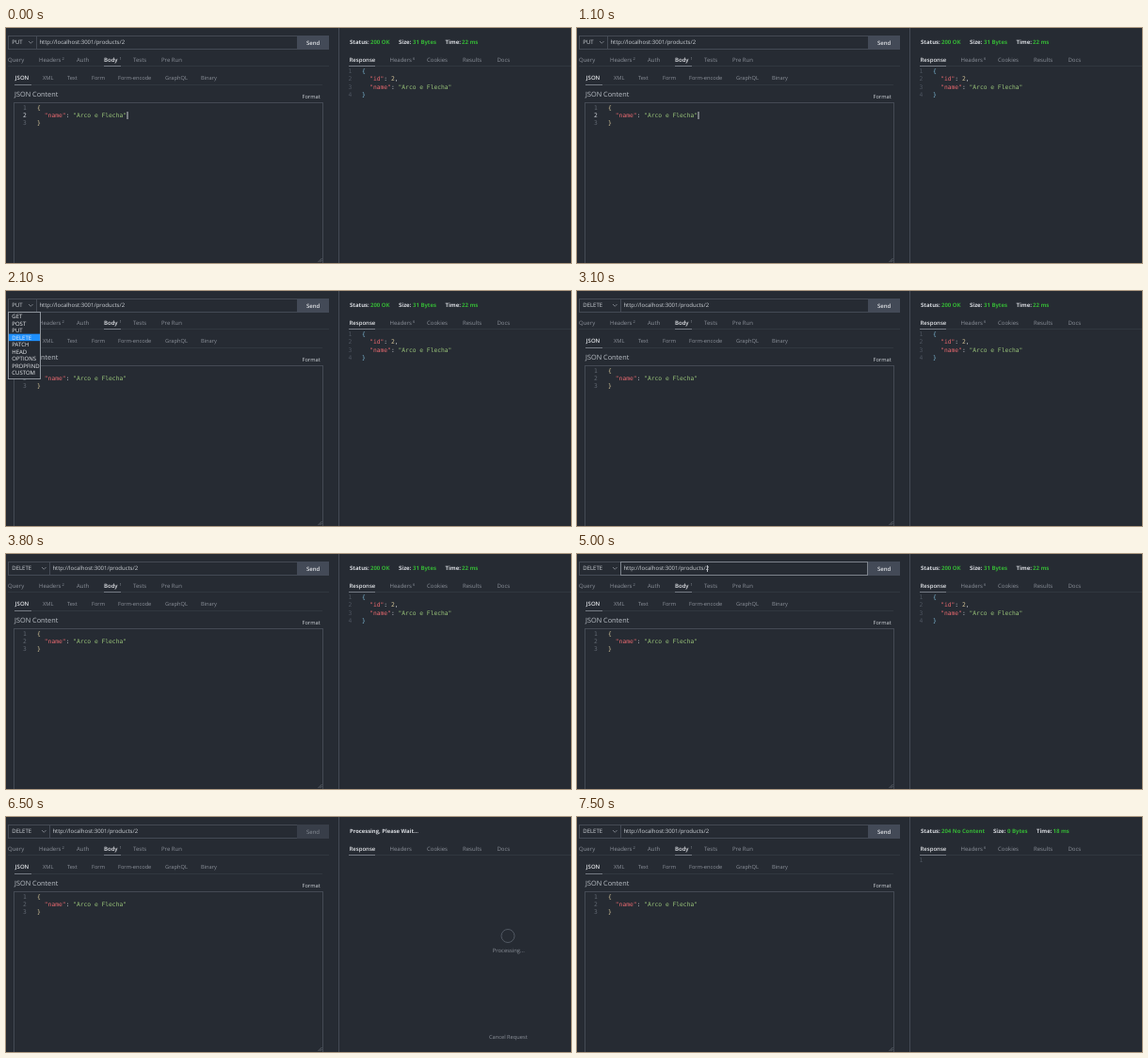
An HTML page that plays this animation: 600 by 250 pixels, repeating every 8 s.

```html
<!DOCTYPE html>
<html lang="en">
<head>
<meta charset="utf-8">
<style>
html, body { margin: 0; width: 100%; height: 100%; overflow: hidden; background: #262b33; }
svg { display: block; width: 600px; height: 250px; }
text { font: 6px "Open Sans", "Noto Sans", sans-serif; fill: #8b9099; text-rendering: geometricPrecision; white-space: pre; }
.lit { fill: #cfd3d8; }
.on { fill: #e2e4e8; font-weight: 600; }
.bold { fill: #d6d9de; font-weight: 700; }
.ok { fill: #35b336; font-weight: 700; }
.title { font-size: 7.3px; fill: #bcc1c8; }
.small { font-size: 5.7px; }
.wait { font-size: 5.85px; }
.item { fill: #eceef1; }
.sup { font-size: 4px; fill: #9298a1; }
.code { font: 6.3px "DejaVu Sans Mono", monospace; fill: #c9cdd3; }
.num { fill: #626973; }
.far { fill: #4e5560; }
.now { fill: #d0d4da; }
.key { fill: #e8696f; }
.str { fill: #98c379; }
.brace { fill: #d6c79a; }
.cool { fill: #7db9d6; }
</style>
</head>
<body>
<svg id="stage" viewBox="0 0 600 250"></svg>
<script>
const LOOP = 8000;
const LINE = "#444a54", FAINT = "#31373f", UNDER = "#747a83";
const text = (x, y, s, cls = "") => `<text x="${x}" y="${y}" class="${cls}">${s}</text>`;
const rect = (x, y, w, h, fill) => `<rect x="${x}" y="${y}" width="${w}" height="${h}" fill="${fill}"/>`;
const box = (x, y, w, h, stroke, fill = "none") =>
  `<rect x="${x + .5}" y="${y + .5}" width="${w - 1}" height="${h - 1}" fill="${fill}" stroke="${stroke}"/>`;
const span = (s, cls) => `<tspan class="${cls}">${s}</tspan>`;
// Content shown only during the listed "from-to" times
const during = (times, ...parts) => `<g data-times="${times}">${parts.join("")}</g>`;
const tabs = (y, list, active, cls = "") =>
  list.map(([x, s]) => text(x, y, s, s === active ? "on" : cls)).join("");

const nameLine = span('"name"', "key") + ": " + span('"Arco e Flecha"', "str");

function status(code, size, sizeX, timeX, time) {
  return text(365, 17.4, "Status:", "bold") + text(387, 17.4, code, "ok") +
    text(sizeX, 17.4, "Size:", "bold") + text(sizeX + 15, 17.4, size, "ok") +
    text(timeX, 17.4, "Time:", "bold") + text(timeX + 17.5, 17.4, time, "ok");
}

function method(name, width) {
  const a = width - 8;
  return text(6.3, 17.4, name, "lit") + rect(width, 9, 1, 13, LINE) +
    `<path d="M${a} 14l2.3 2.3 2.3-2.3" fill="none" stroke="#8b9099" stroke-width=".8"/>` +
    text(width + 3.4, 17.3, "http://localhost:3001/products/2", "lit");
}

function send(fill, cls) {
  return rect(309, 8, 34, 15, fill) + text(319, 17.5, "Send", cls);
}

function menu() {
  const items = "GET POST PUT DELETE PATCH HEAD OPTIONS PROPFIND CUSTOM".split(" ");
  const rowY = i => 23 + i * 7.55;
  const mark = (times, i) => during(times, rect(3, rowY(i), 33, 7.5, "#1e90ff"));
  return box(2, 22, 35, 72, "#8f959d", "#262b33") +
    mark("1300-1900", 2) + mark("1900-2000", 0) + mark("2000-2100", 4) + mark("2100-3050", 3) +
    items.map((s, i) => text(6.3, rowY(i) + 6, s, "item")).join("");
}

const request = [
  box(2, 8, 341, 15, LINE),
  during("0-3050", method("PUT", 32)),
  during("3050-8000", method("DELETE", 46)),
  during("0-6150 7500-8000", send("#434a57", "on")),
  during("6150-6400 6600-7500", send("#4b5362", "on")),
  during("6400-6600", send("#383e49", "")),
  during("5000-6400", box(46, 8, 263, 15, "#7d838c")),
  during("5000-5600 6100-6400", rect(138, 12, 1, 7, "#b9bdc3")),
  tabs(36.1, [[2, "Query"], [35, "Headers"], [75, "Auth"], [104, "Body"], [135, "Tests"], [165, "Pre Run"]], "Body"),
  text(59.5, 34, "2", "sup"), text(120.5, 34, "1", "sup"),
  rect(2, 40, 341, 1, FAINT), rect(104, 40, 18, 1, UNDER),
  tabs(55.2, [[9.8, "JSON"], [39, "XML"], [65, "Text"], [91, "Form"], [119, "Form-encode"], [169, "GraphQL"], [207, "Binary"]], "JSON", "small"),
  rect(9, 60, 327, 1, FAINT), rect(9, 60, 18, 1, UNDER),
  text(9, 73.2, "JSON Content", "title"), text(314.5, 74.6, "Format", "small lit")
];

const editor = [
  box(8, 79, 329, 172, LINE),
  `<path d="M331.500 249l4-4M333.500 249l2-2" stroke="#7b818a" stroke-width=".6"/>`,
  text(18, 86.5, "1", "code num"), text(18, 103.4, "3", "code num"),
  during("0-1300", text(18, 95, "2", "code now")),
  during("1300-8000", text(18, 95, "2", "code num")),
  text(33, 86.5, "{", "code brace"), text(40.8, 95, nameLine, "code"), text(33, 103.4, "}", "code brace"),
  during("0-400 800-1300", rect(128.5, 89, 1, 8, "#c5c9ce"))
];

const response = [
  rect(353, 0, 1, 250, LINE),
  tabs(36.1, [[364.5, "Response"], [407.5, "Headers"], [447, "Cookies"], [485, "Results"], [521.5, "Docs"]], "Response"),
  rect(364, 40, 236, 1, FAINT), rect(364, 40, 28, 1, UNDER),
  during("0-6400 6600-8000", text(432, 34, "6", "sup")),
  during("0-6400",
    status("200 OK", "31 Bytes", 417, 466.5, "22 ms"),
    ...[1, 2, 3, 4].map(n => text(363.5, 39.1 + n * 8.5, n, "code far")),
    text(378, 47.6, "{", "code cool"),
    text(386.2, 56.1, span('"id"', "key") + ": " + span("2", "brace") + ",", "code"),
    text(386.2, 64.6, nameLine, "code"),
    text(378, 73.1, "}", "code cool")),
  during("6400-6600",
    text(365, 17.4, "Processing, Please Wait...", "bold wait"),
    `<circle cx="533" cy="126.500" r="7" fill="none" stroke="#525963"/>`,
    text(516.8, 144, "Processing...", "wait"),
    text(513, 235.6, "Cancel Request", "small")),
  during("6600-8000",
    status("204 No Content", "0 Bytes", 442, 488, "18 ms"),
    text(363.5, 47.6, "1", "code far"))
];

const stage = document.getElementById("stage");
stage.innerHTML = [...request, ...editor, ...response, during("1300-3050", menu())].join("");

const timed = [...stage.querySelectorAll("[data-times]")].map(el => ({
  el, spans: el.dataset.times.split(" ").map(s => s.split("-").map(Number))
}));

function draw(now) {
  const t = now % LOOP;
  for (const { el, spans } of timed)
    el.style.display = spans.some(([a, b]) => t >= a && t < b) ? "" : "none";
}

const start = performance.now();
function tick() {
  draw(performance.now() - start);
  requestAnimationFrame(tick);
}
tick();
</script>
</body>
</html>
```
